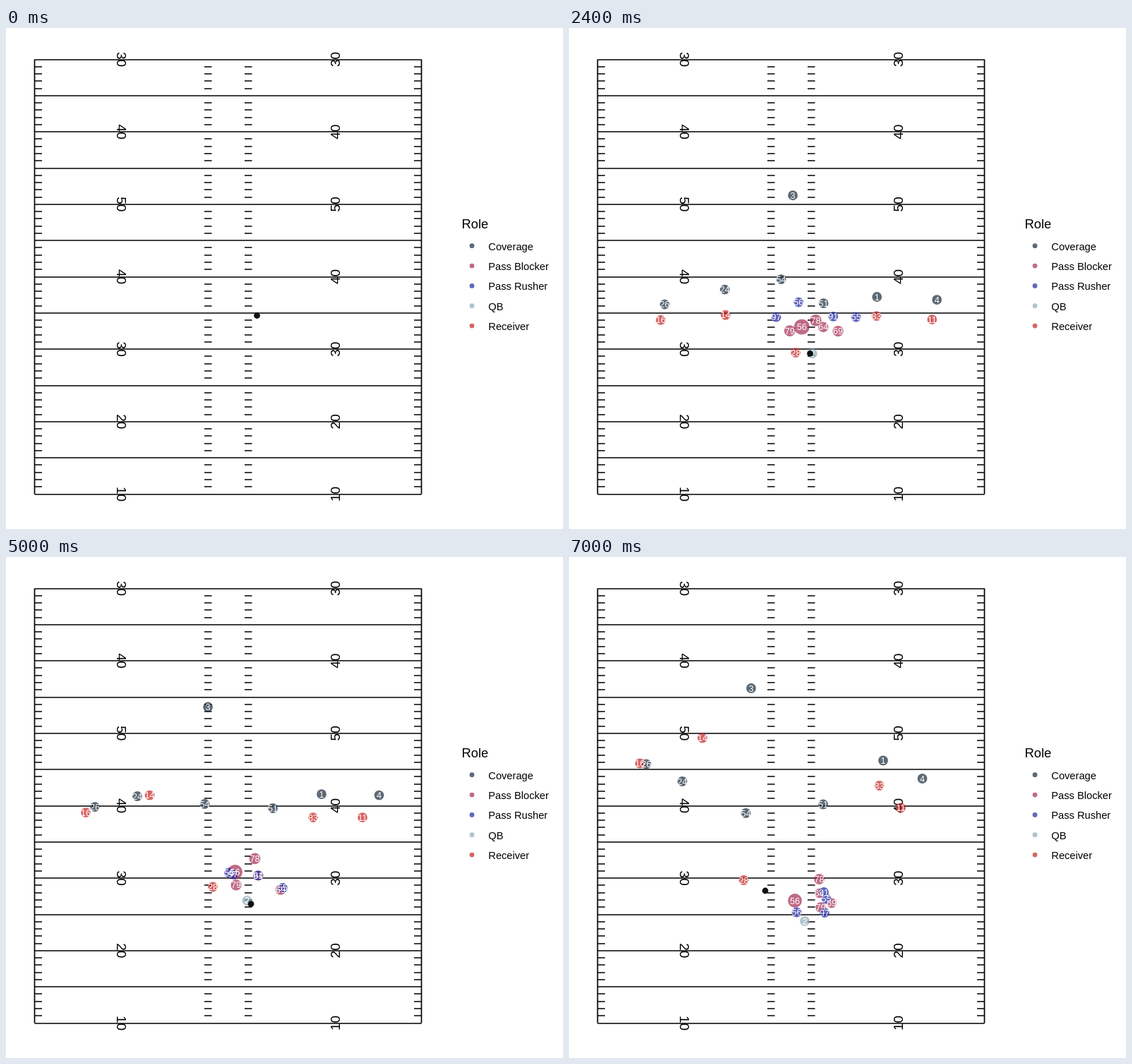
Write an HTML page with a canvas that moves like this. It is 789 by 710 pixels and loops after 7.2 s.

```html
<!DOCTYPE html>
<html lang="en">
<head>
<meta charset="utf-8">
<title>Pass play</title>
<style>
html, body { margin: 0; height: 100%; overflow: hidden; background: #fff; }
canvas { display: block; }
</style>
</head>
<body>
<canvas id="stage" width="789" height="710"></canvas>
<script>
const ctx = document.getElementById('stage').getContext('2d');
const LOOP = 7200, STEP = 200, SNAP = 1600, END = 7000;
const LEFT = 40.5, RIGHT = 588.5, TOP = 44.5, YARD = 616 / 60;

// Player: number, start, halfway point, end, optional dot radius
const roles = [
  { name: 'Coverage', color: 'rgba(24,42,58,.7)', players: [
    [3, [321.5, 240.5], [286, 212.5], [258, 186]],
    [54, [302.5, 358], [281.5, 350], [250.5, 363]],
    [24, [226, 375.5], [186, 339], [160.5, 318]],
    [26, [136.5, 395.5], [126, 354], [109.5, 293.5]],
    [51, [356, 396.5], [378, 356], [360, 350.5]],
    [1, [434, 387], [447, 336], [445, 288.5]],
    [4, [518, 393], [528.5, 337.5], [500.5, 314]],
  ] },
  { name: 'Pass Blocker', color: 'rgba(165,45,84,.7)', players: [
    [79, [312, 424], [326, 465], [356.5, 496.5], 8],
    [56, [330.5, 421.5], [324.5, 446.5], [320, 487], 11],
    [78, [349, 413.5], [352.5, 427.5], [354.5, 456.5], 8.3],
    [64, [360.5, 420], [357.5, 451.5], [354.5, 476.5], 7.4],
    [69, [378.5, 422.5], [389, 471.5], [372, 490.5], 7.7],
  ] },
  { name: 'Pass Rusher', color: 'rgba(31,39,162,.7)', players: [
    [97, [290.5, 405], [321.5, 450], [362, 504]],
    [56, [327.5, 380.5], [316, 447.5], [322.5, 503.5]],
    [91, [378, 402], [357, 451.5], [361, 475]],
    [55, [408, 399], [392, 469], [364.5, 484.5]],
  ] },
  { name: 'QB', color: 'rgba(142,171,182,.7)', players: [
    [2, [345, 458], [341.5, 487], [334, 516]],
  ] },
  { name: 'Receiver', color: 'rgba(198,37,36,.7)', players: [
    [16, [132.5, 420], [113, 362], [100.5, 292.5]],
    [14, [224.5, 415.5], [203.5, 337.5], [189, 256.5]],
    [28, [324, 458], [293, 467.5], [247.5, 458]],
    [83, [436, 413], [435, 369], [439.5, 324]],
    [11, [514, 421], [505, 369], [470, 355.5]],
  ] },
];

// Ball legs: snap, catch, drop back, throw (time, x, y)
const ballPath = [
  [1000, 355.5, 407.5], [SNAP, 343.5, 431], [2600, 341, 469],
  [6200, 350, 503], [END, 278, 473],
];

// Players speed up from rest; the halfway point falls at progress 0.5
const progress = t => Math.max(0, (t - SNAP) / (END - SNAP)) ** 1.5;

function curve(start, middle, end, p) {
  return start.map((a, i) => {
    const b = end[i], bend = middle[i] - (a + b) / 2;
    return a + (b - a) * p + 4 * p * (1 - p) * bend;
  });
}

function ballAt(t) {
  const next = ballPath.findIndex(([time]) => t <= time);
  if (next === 0) return ballPath[0].slice(1);
  const [t0, x0, y0] = ballPath[next - 1], [t1, x1, y1] = ballPath[next];
  const u = (t - t0) / (t1 - t0);
  return [x0 + (x1 - x0) * u, y0 + (y1 - y0) * u];
}

function dot(x, y, radius, color) {
  ctx.fillStyle = color;
  ctx.beginPath();
  ctx.arc(x, y, radius, 0, 2 * Math.PI);
  ctx.fill();
}

function text(label, x, y, size, color = '#000', align = 'left', angle = 0) {
  ctx.save();
  ctx.translate(x, y);
  ctx.rotate(angle);
  ctx.font = `${size}px "Liberation Sans", Arial, sans-serif`;
  ctx.fillStyle = color;
  ctx.textAlign = align;
  ctx.fillText(label, 0, size * 0.358);
  ctx.restore();
}

function drawField() {
  ctx.strokeStyle = '#000';
  ctx.lineWidth = 1.7;
  ctx.beginPath();
  for (let yard = 0; yard <= 60; yard++) {
    const y = Math.round(TOP + yard * YARD);
    const spans = yard % 5
      ? [[LEFT, 51], [281, 291.5], [338, 348.5], [578, RIGHT]]
      : [[LEFT, RIGHT]];
    for (const [from, to] of spans) {
      ctx.moveTo(from, y);
      ctx.lineTo(to, y);
    }
  }
  for (const x of [LEFT, RIGHT]) {
    ctx.moveTo(x, TOP);
    ctx.lineTo(x, TOP + 60 * YARD);
  }
  ctx.stroke();
  for (let i = 0; i <= 6; i++) {
    const label = 50 - 10 * Math.abs(i - 2), y = TOP + i * 10 * YARD;
    text(label, 163.5, y, 19, '#000', 'center', Math.PI / 2);
    text(label, 466.3, y, 19, '#000', 'center', -Math.PI / 2);
  }
}

function drawLegend() {
  text('Role', 645.5, 277.8, 18.33);
  roles.forEach(({ name, color }, i) => {
    const y = 308.7 + i * 28.35;
    dot(660, y, 3.4, color);
    text(name, 683.3, Math.round(y) + 0.75, 14.67);
  });
}

function drawPlayers(t) {
  const p = progress(t), labels = [];
  for (const { color, players } of roles) {
    for (const [number, start, middle, end, radius] of players) {
      const [x, y] = curve(start, middle, end, p);
      dot(x, y, radius ? radius * (1 - 0.1 * p) : 6.9, color);
      labels.push([number, x, y]);
    }
  }
  for (const [number, x, y] of labels) text(number, x, y, 12.6, '#fff', 'center');
}

function draw() {
  const t = Math.floor(performance.now() % LOOP / STEP) * STEP;
  ctx.fillStyle = '#fff';
  ctx.fillRect(0, 0, 789, 710);
  drawField();
  drawLegend();
  if (t > 0) drawPlayers(t);
  dot(...ballAt(t), 4.4, '#111');
  requestAnimationFrame(draw);
}
draw();
</script>
</body>
</html>
```
